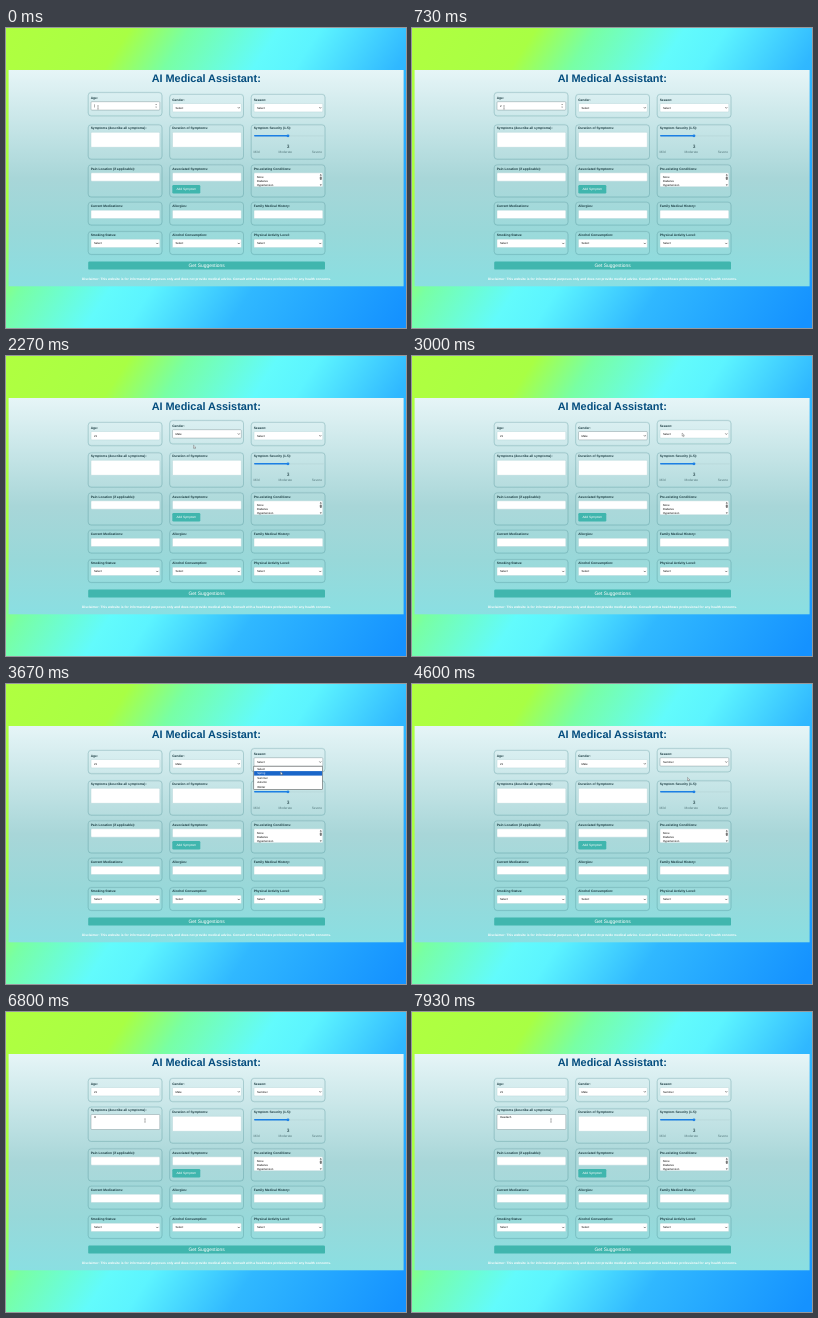
Animation, 400 px wide and 300 px high, one loop 8000 ms. Source, as an HTML page:

```html
<!DOCTYPE html>
<html lang="en">
<head>
<meta charset="utf-8">
<title>AI Medical Assistant</title>
<style>
  html, body { margin: 0; width: 100%; height: 100%; overflow: hidden; }
  body { background: linear-gradient(123deg, #b0ff40 0%, #a8ff44 21%, #78ffa4 31%, #62fbfc 46%, #5cf4ff 53%, #30b8ff 70%, #1592ff 98%); }
  svg { position: absolute; left: 0; top: 0; width: 400px; height: 300px; }
  text { font-family: "Liberation Sans", Arial, sans-serif; text-rendering: geometricPrecision; white-space: pre; }
  .label { font-size: 3.25px; font-weight: bold; fill: #17383e; }
  .value { font-size: 2.8px; fill: #000; }
  .scale { font-size: 3.25px; fill: #55787c; }
  .white { fill: #fff; }
  .middle { text-anchor: middle; }
  .end { text-anchor: end; }
</style>
</head>
<body>
<svg id="stage" viewBox="0 0 400 300">
  <defs>
    <linearGradient id="page" x1="0" y1="0" x2="0" y2="1">
      <stop offset="0" stop-color="#e6f5f7"/>
      <stop offset="0.5" stop-color="#a8d6d8"/>
      <stop offset="0.75" stop-color="#98d8d9"/>
      <stop offset="1" stop-color="#8adfe2"/>
    </linearGradient>
    <filter id="soft" x="-10%" y="-20%" width="120%" height="140%"><feGaussianBlur stdDeviation="0.6"/></filter>
  </defs>
  <rect x="2.6" y="42" width="395" height="216.3" fill="url(#page)"/>
</svg>
<script>
const LOOP = 8000;
const TEAL = '#40b6ae';
const stage = document.getElementById('stage');

function add(parent, tag, attrs, text) {
  const node = document.createElementNS('http://www.w3.org/2000/svg', tag);
  for (const key in attrs) node.setAttribute(key, attrs[key]);
  if (text !== undefined) node.textContent = text;
  parent.appendChild(node);
  return node;
}
const rect = (p, x, y, width, height, fill, more) => add(p, 'rect', { x, y, width, height, fill, ...more });
const write = (p, x, y, cls, text, more) => add(p, 'text', { x, y, class: cls, ...more }, text);
const path = (p, d, fill, more) => add(p, 'path', { d, fill, ...more });
const show = (node, on) => node.setAttribute('visibility', on ? 'visible' : 'hidden');

const columns = [82, 163.5, 245];
const rows = [
  { top: 65.8, height: 23.4, label: 72.5 },
  { top: 96.3, height: 34.4, label: 101.3 },
  { top: 136.3, height: 32.2, label: 141.8 },
  { top: 173.6, height: 23, label: 179.2 },
  { top: 203, height: 23, label: 208.2 }
];

function card(col, row, label, kind) {
  const x = columns[col], { top, height, label: base } = rows[row];
  const group = add(stage, 'g', {});
  rect(group, x + 0.2, top + 0.6, 73.8, height, 'none', { rx: 3, stroke: '#2a7078', 'stroke-opacity': 0.28, 'stroke-width': 0.8, filter: 'url(#soft)' });
  rect(group, x + 0.2, top, 73.8, height, '#fff', { rx: 3, 'fill-opacity': 0.04, stroke: '#6fb0b4', 'stroke-opacity': 0.3, 'stroke-width': 0.4 });
  write(group, x + 2.7, base, 'label', label);
  const result = { group };
  if (kind === 'slider') return result;
  const fieldTop = base + 3, fieldHeight = { area: 15, list: 14 }[kind] || 8.4;
  result.field = rect(group, x + 3, fieldTop, 68.8, fieldHeight, '#fff', { rx: 0.9, stroke: '#a9cfd2', 'stroke-width': 0.4 });
  if (kind === 'select') {
    path(group, `M${x + 68.3} ${fieldTop + 3.7}l1 1.1l1 -1.1`, 'none', { stroke: '#222', 'stroke-width': 0.5 });
  }
  result.value = write(group, x + 6, fieldTop + (kind === 'area' ? 3.5 : 5.1), 'value', kind === 'select' ? 'Select' : '');
  return result;
}

write(stage, 200.2, 54.2, 'middle', 'AI Medical Assistant:', { 'font-size': 10.9, 'font-weight': 'bold', fill: '#044d7e' });

const age = card(0, 0, 'Age:', 'input');
const gender = card(1, 0, 'Gender:', 'select');
const season = card(2, 0, 'Season:', 'select');
const symptoms = card(0, 1, 'Symptoms (describe all symptoms):', 'area');
card(1, 1, 'Duration of Symptoms:', 'area');
const severity = card(2, 1, 'Symptom Severity (1-5):', 'slider').group;
card(0, 2, 'Pain Location (if applicable):', 'input');
const associated = card(1, 2, 'Associated Symptoms:', 'input').group;
const conditions = card(2, 2, 'Pre-existing Conditions:', 'list').group;
card(0, 3, 'Current Medications:', 'input');
card(1, 3, 'Allergies:', 'input');
card(2, 3, 'Family Medical History:', 'input');
card(0, 4, 'Smoking Status:', 'select');
card(1, 4, 'Alcohol Consumption:', 'select');
card(2, 4, 'Physical Activity Level:', 'select');

rect(severity, 248, 107.2, 70, 1.2, '#bcdcde', { rx: 0.6 });
rect(severity, 248, 107, 34.5, 1.6, '#1b7fe4', { rx: 0.8 });
add(severity, 'circle', { cx: 282, cy: 107.8, r: 1.4, fill: '#1b7fe4' });
write(severity, 282, 120.4, 'middle', '3', { 'font-size': 4.8, fill: '#0f2c32' });
write(severity, 247.6, 125.4, 'scale', 'Mild');
write(severity, 279.3, 125.4, 'scale middle', 'Moderate');
write(severity, 316, 125.4, 'scale end', 'Severe');

rect(associated, 166.3, 157, 28, 8.4, TEAL, { rx: 1.2 });
write(associated, 180.3, 162.3, 'white middle', 'Add Symptom', { 'font-size': 3.15 });

['None', 'Diabetes', 'Hypertension'].forEach((name, i) => write(conditions, 250.8, 149.9 + i * 3.85, 'value', name));
path(conditions, 'M313.7 147.4l1.1 -1.4l1.1 1.4zM313.7 156.4l1.1 1.4l1.1 -1.4z', '#444');
rect(conditions, 313.8, 148.6, 2, 3.4, '#777', { rx: 1 });

rect(stage, 82.2, 233.6, 236.8, 8, TEAL, { rx: 1.2 });
write(stage, 200.6, 239.2, 'white middle', 'Get Suggestions', { 'font-size': 4.9 });
write(stage, 200.5, 252.3, 'label middle', 'Disclaimer: This website is for informational purposes only and does not provide medical advice. Consult with a healthcare professional for any health concerns.', { style: 'fill:#fff' });

const spinner = path(age.group, 'M149.3 78.9l.8 -1l.8 1zM149.3 80.5l.8 1l.8 -1z', '#555');
const caret = rect(stage, 0, 0, 0.35, 3.2, '#222');

function popup(x, options) {
  const group = add(stage, 'g', {}), top = 82.2, step = 4.5;
  rect(group, x, top, 68.6, options.length * step + 0.8, '#fff', { stroke: '#444', 'stroke-width': 0.5 });
  const bar = rect(group, x + 0.3, top, 68, step, '#1a66c9');
  const labels = options.map((name, i) => write(group, x + 3.4, top + 3.5 + i * step, 'value', name));
  return (open, pick) => {
    show(group, open);
    bar.setAttribute('y', top + 0.4 + pick * step);
    labels.forEach((node, i) => { node.style.fill = i === pick ? '#fff' : '#000'; });
  };
}
const genderList = popup(166.3, ['Select', 'Male', 'Female', 'Other']);
const seasonList = popup(247.8, ['Select', 'Spring', 'Summer', 'Autumn', 'Winter']);

const arrow = path(stage, 'M0 0v3.1l.75 -.65l.5 1.15l.6 -.25l-.5 -1.1h.95z', '#fff', { stroke: '#444', 'stroke-width': 0.35 });
const beam = path(stage, 'M-.6 -1.7h1.2M0 -1.7v3.4M-.6 1.7h1.2', 'none', { stroke: '#444', 'stroke-width': 0.4 });

// time, x, y
const route = [
  [0, 92, 79.4], [950, 92, 79.4], [1400, 186.7, 75.3], [1750, 186.7, 75.3],
  [2100, 187.5, 89], [2270, 187.5, 89.2], [2950, 270, 77], [3250, 272, 78],
  [3600, 274.5, 87.5], [3850, 274.5, 88], [4100, 275.5, 93], [4700, 275.5, 93.5],
  [5400, 172.3, 88.4], [5550, 172.3, 88.6], [6200, 139, 108.5], [LOOP, 139, 108.5]
];
const clamp = v => Math.max(0, Math.min(1, v));
const ease = v => v * v * (3 - 2 * v);
const within = (t, from, to) => t >= from && t < to;

function pointer(t) {
  const i = route.findIndex(stop => stop[0] > t);
  const [t0, x0, y0] = route[i - 1], [t1, x1, y1] = route[i];
  const k = ease((t - t0) / (t1 - t0));
  return [x0 + (x1 - x0) * k, y0 + (y1 - y0) * k];
}

function lift(item, t, ...spans) {
  const k = Math.max(...spans.map(([from, to]) => ease(clamp((t - from) / 250)) * (1 - ease(clamp((t - to) / 250)))));
  item.group.setAttribute('transform', `translate(0 ${-1.8 * k})`);
}

function focus(item, on) {
  item.field.setAttribute('stroke', on ? '#6d8488' : '#a9cfd2');
}

function draw(t) {
  lift(age, t, [-300, 1050]);
  lift(gender, t, [1150, 2420], [5020, 5680]);
  lift(season, t, [2650, 4800]);
  lift(symptoms, t, [5950, 9000]);

  focus(age, t < 1650);
  focus(gender, within(t, 1650, 3080));
  focus(season, within(t, 3080, 6300));
  focus(symptoms, t >= 6300);
  show(spinner, t < 1650);

  age.value.textContent = '21'.slice(0, t < 500 ? 0 : t < 750 ? 1 : 2);
  gender.value.textContent = t < 2180 ? 'Select' : 'Male';
  season.value.textContent = t < 4350 ? 'Select' : 'Summer';
  const typed = Math.max(0, Math.floor((t - 6500) / 200));
  symptoms.value.textContent = 'Headach'.slice(0, typed);

  genderList(within(t, 1700, 2180), t < 1980 ? 0 : 1);
  seasonList(within(t, 3120, 4350), t < 3480 ? 0 : t < 3980 ? 1 : 2);

  const active = t < 1650 ? age : symptoms;
  const width = active.value.textContent ? active.value.getComputedTextLength() : 0;
  caret.setAttribute('x', 88.1 + width);
  caret.setAttribute('y', t < 1650 ? (t < 1150 ? 76.3 : 78.1) : 103.6);
  show(caret, (t < 1650 || t >= 6300) && t % 1000 < 500);

  const [x, y] = pointer(t);
  const overText = t < 1020 || t > 6080;
  for (const node of [arrow, beam]) node.setAttribute('transform', `translate(${x} ${y})`);
  show(arrow, !overText);
  show(beam, overText);
}

function tick() {
  draw(performance.now() % LOOP);
  requestAnimationFrame(tick);
}
tick();
</script>
</body>
</html>
```
